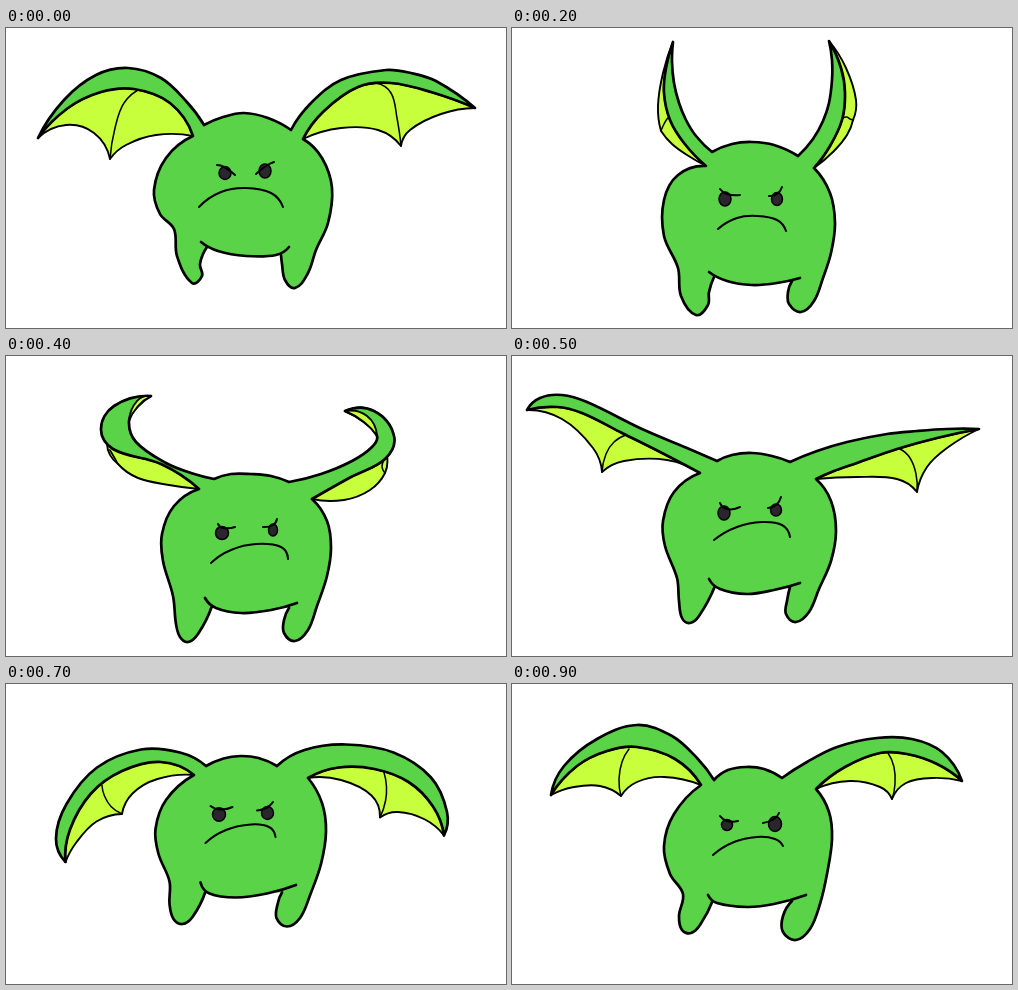
An HTML page for the animation above (1000 ms loop, 500x300 px).

```html
<!DOCTYPE html>
<html lang="en">
<head>
<meta charset="utf-8">
<title>Grumpy flyer</title>
<style>
html, body { margin: 0; width: 100%; height: 100%; overflow: hidden; background: #fff; }
svg { display: block; width: 100%; height: 100%; }
path { fill: none; stroke: #000; stroke-linecap: round; stroke-linejoin: round; }
.skin { fill: #5ad348; stroke-width: 2.7; }
.web { fill: #c8ff3c; stroke-width: 1.9; }
.rib { stroke-width: 1.5; }
.line { stroke-width: 2; }
.eye { fill: #29262d; stroke-width: 1.5; }
</style>
</head>
<body>
<svg id="stage" viewBox="0 0 500 300"></svg>
<script>
const STEP = 100, STEPS = 10;

// wing: arm (tip to root) / lower edge of the arm / web with its finger tip / rib
// side: from the wing root around the leg to the belly; eyes: x,y rx,ry
const KEYS = {
  0: {
    left: '32,110 58,72 90,47 122,40 155,50 180,73 198,97 / 62,80 95,64 128,61 164,75 / 60,97 88,105 104,131 120,117 150,107 / 109,100 118,75 136,60',
    right: '469,80 430,53 405,45 380,42 335,52 305,75 285,102 / 425,64 385,55 352,59 318,83 / 435,86 404,102 395,118 372,102 335,100 / 391,90 385,65 370,55',
    top: '217,89 238,85 262,90',
    sideL: '187,108 160,130 148,162 154,186 168,201 171,228 186,255 196,248 194,236 201,219',
    sideR: '297,111 316,130 326,160 322,195 310,222 302,245 289,260 279,252 276,236 275,227',
    belly: '195,214 212,223 240,228 270,227 283,219',
    mouth: '193,179 215,164 240,160 265,165 277,179',
    eyes: '219,145 6,6.5 259,143 6,7',
    browL: '211,137 218,139 229,147', browR: '268,134 260,138 250,146'
  },
  2: {
    left: '161,14 160,34 162,55 167,75 174,92 184,108 200,124 / 154,40 152,65 158,92 172,115 / 151,45 146,78 149,103 160,116 175,127 / 152,96 155,91 157,89',
    right: '317,13 320,32 320,52 317,75 311,93 301,111 286,128 / 329,40 333,65 330,92 318,118 / 334,40 344,72 341,92 335,107 322,123 / 338,91 335,89 331,90',
    top: '220,116 240,114 262,117',
    sideL: '194,138 166,147 152,172 152,208 166,240 169,268 184,287 196,277 197,264 202,249',
    sideR: '302,140 318,165 323,195 319,225 311,250 302,273 289,284 277,276 276,264 280,253',
    belly: '197,244 215,253 240,257 265,255 288,250',
    mouth: '206,201 225,190 245,188 265,192 274,203',
    eyes: '213,171 6,7 265,171 5.5,6.5',
    browL: '208,161 215,166 228,167', browR: '270,159 265,166 257,168'
  },
  4: {
    left: '145,40 132,50 123,65 130,86 160,107 185,117 208,123 / 108,50 95,73 107,93 155,108 / 110,60 101,88 112,108 132,122 163,129 / 104,94 106,98 109,103',
    right: '339,55 358,66 371,80 366,91 346,105 315,118 283,126 / 368,55 388,80 379,103 345,121 / 370,65 381,100 379,117 364,134 338,144 / 377,114 376,110 378,104',
    curls: ['145,40 131,45 123,65 / 132,50 145,40', '339,55 361,60 371,80 / 358,66 339,55'],
    top: '225,118 245,118 265,120',
    sideL: '193,133 168,150 156,178 157,205 167,240 170,268 174,281 182,286 192,278 206,250',
    sideR: '306,143 321,165 325,192 321,220 311,250 302,274 289,285 278,277 278,264 283,252',
    belly: '199,242 210,252 235,257 265,254 291,247',
    mouth: '205,207 225,194 250,188 275,191 282,203',
    eyes: '216,177 6.5,6.5 267,174 4.5,6',
    browL: '212,168 217,172 229,171', browR: '271,163 267,169 257,171'
  },
  5: {
    left: '15,54 28,42 50,39 75,46 130,73 175,92 205,105 / 45,51 70,57 110,77 150,97 / 50,63 81,92 90,116 112,105 155,104 / 94,98 102,86 114,79',
    right: '467,73 435,73 405,75 375,78 335,86 305,95 278,106 / 425,82 385,93 345,107 322,115 / 435,92 415,111 405,136 385,123 345,121 / 404,118 398,102 388,93',
    top: '220,99 240,97 260,100',
    sideL: '188,117 162,136 151,165 153,190 165,222 167,245 170,262 178,267 187,260 203,230',
    sideR: '304,123 319,145 324,175 319,205 307,233 297,256 284,266 274,258 275,245 278,231',
    belly: '197,223 208,233 235,238 262,234 288,227',
    mouth: '202,184 225,171 250,166 270,169 278,181',
    eyes: '212,157 6,7 264,154 5.5,6',
    browL: '208,147 215,153 228,151', browR: '269,141 264,149 256,152'
  },
  6: {
    left: '3,158 17,128 45,100 85,82 130,74 170,74 203,79 / 35,126 75,101 110,89 150,84 / 30,143 62,137 99,138 113,117 143,99 / 88,125 85,110 88,97',
    right: '480,125 460,103 430,84 390,70 345,66 305,70 273,81 / 445,100 405,87 365,83 330,85 / 445,117 408,120 398,133 386,111 345,93 / 398,112 393,97 385,85',
    top: '220,73 237,71 255,73',
    sideL: '188,90 160,112 150,140 153,165 164,195 164,220 168,235 176,239 186,232 200,205',
    sideR: '303,93 317,118 322,145 318,175 306,210 294,233 282,240 273,232 274,217 277,206',
    belly: '195,197 207,208 235,212 262,208 291,199',
    mouth: '200,158 220,144 245,139 264,142 270,152',
    eyes: '214,129 6.5,7 263,128 6,6.5',
    browL: '206,121 215,125 228,123', browR: '268,117 262,122 253,124'
  },
  8: {
    left: '116,198 83,181 76,140 97,85 140,57 178,63 197,85 / 93,165 95,118 122,85 160,72 / 112,172 119,138 133,122 140,102 160,91 / 122,120 112,114 104,106',
    right: '396,178 422,153 420,103 385,67 335,55 292,62 269,83 / 409,145 400,109 372,87 335,82 / 393,154 376,136 350,134 345,112 325,99 / 361,122 368,108 371,92',
    top: '215,76 232,73 250,75',
    sideL: '188,92 160,120 149,150 152,175 163,200 163,220 167,235 177,241 187,234 199,210',
    sideR: '301,95 315,120 318,150 312,185 303,210 294,235 280,245 268,236 270,220 275,211',
    belly: '194,200 200,211 225,215 260,211 289,203',
    mouth: '199,160 220,148 245,142 262,144 269,154',
    eyes: '212,132 6.5,6.5 260,130 6,6.5',
    browL: '203,123 213,126 225,123', browR: '266,119 260,125 249,129'
  },
  9: {
    left: '39,111 52,82 85,55 125,41 160,52 185,74 202,96 / 65,82 95,67 125,63 163,75 / 62,103 88,102 109,112 125,98 152,93 / 107,95 110,78 117,65',
    right: '450,97 430,68 400,55 365,54 325,63 295,78 270,94 / 425,80 395,70 368,69 333,83 / 420,94 394,99 380,115 368,103 338,97 / 383,100 382,83 376,69',
    top: '216,86 234,83 252,85',
    sideL: '189,101 162,130 152,162 158,190 171,210 167,232 170,246 179,249 188,241 201,216',
    sideR: '304,105 317,128 320,155 315,190 308,220 298,245 284,256 271,248 271,232 280,217',
    belly: '196,211 205,219 235,223 262,220 294,211',
    mouth: '201,171 222,158 245,153 263,155 271,162',
    eyes: '215,141 5.5,5.5 263,140 6.5,7.5',
    browL: '208,132 215,137 226,137', browR: '267,129 262,135 251,139'
  }
};

const parse = text => text.split(' / ').map(run => run.split(' ').map(p => p.split(',').map(Number)));
const mapObject = (obj, fn) => Object.fromEntries(Object.entries(obj).map(([k, v]) => [k, fn(v, k)]));
const mix = (a, b, u) => Array.isArray(a) ? a.map((v, i) => mix(v, b[i], u)) : a + (b - a) * u;
const flip = pts => [...pts].reverse();

for (const key in KEYS) {
  KEYS[key] = mapObject(KEYS[key], v => Array.isArray(v) ? v.map(parse) : parse(v));
}

// Poses between two drawings are blended halfway.
function poseAt(step) {
  if (KEYS[step]) return KEYS[step];
  const a = KEYS[step - 1], b = KEYS[step + 1];
  const { curls, ...shared } = a;
  return mapObject(shared, (v, k) => mix(v, b[k], 0.5));
}

// Smooth curve through the points, handles scaled to each chord.
function spline(pts) {
  const last = pts.length - 1;
  const tangent = i => {
    const dx = pts[i + 1][0] - pts[i - 1][0], dy = pts[i + 1][1] - pts[i - 1][1];
    const len = Math.hypot(dx, dy) || 1;
    return [dx / len, dy / len];
  };
  let d = '';
  for (let i = 0; i < last; i++) {
    const p = pts[i], q = pts[i + 1];
    const reach = 0.35 * Math.hypot(q[0] - p[0], q[1] - p[1]);
    const along = (o, t, s) => [o[0] + t[0] * reach * s, o[1] + t[1] * reach * s];
    const third = [(q[0] - p[0]) / 3, (q[1] - p[1]) / 3];
    let c1 = i > 0 ? along(p, tangent(i), 1) : null;
    let c2 = i + 1 < last ? along(q, tangent(i + 1), -1) : null;
    if (!c1 && !c2) { c1 = p; c2 = q; }
    if (!c1) c1 = [c2[0] - third[0], c2[1] - third[1]];
    if (!c2) c2 = [c1[0] + third[0], c1[1] + third[1]];
    d += 'C' + [c1, c2, q].map(v => v.map(n => n.toFixed(1)).join(' ')).join(' ');
  }
  return d;
}

// Runs joined end to end, with a corner between them.
const outline = (...runs) => 'M' + runs[0][0].join(' ') + runs.map(spline).join('');

function ellipse([x, y], [rx, ry]) {
  return `M${x - rx} ${y}a${rx} ${ry} 0 1 1 ${2 * rx} 0a${rx} ${ry} 0 1 1 ${-2 * rx} 0Z`;
}

function wing([arm, mids, web, rib], base) {
  const tip = arm[0], finger = web[2];
  const edge = [tip, ...mids, base];
  return {
    arm, edge,
    web: outline(flip(edge), [tip, web[0], web[1], finger], [finger, web[3], web[4], base]) + 'Z',
    rib: outline([finger, ...rib])
  };
}

const stage = document.getElementById('stage');
const part = {};
function add(name, cls) {
  part[name] = document.createElementNS('http://www.w3.org/2000/svg', 'path');
  part[name].setAttribute('class', cls);
  stage.append(part[name]);
}
[['webs', 'web'], ['ribs', 'rib'], ['body', 'skin'], ['curls', 'web'], ['belly', 'skin'],
 ['mouth', 'line'], ['eyes', 'eye'], ['brows', 'line']].forEach(p => add(...p));

function draw(pose) {
  const sideL = pose.sideL[0], sideR = pose.sideR[0], eyes = pose.eyes[0];
  const l = wing(pose.left, sideL[0]), r = wing(pose.right, sideR[0]);
  const top = [l.arm[6], ...pose.top[0], r.arm[6]];
  const shapes = {
    webs: l.web + r.web,
    ribs: l.rib + r.rib,
    body: outline(flip(sideL), flip(l.edge), l.arm, top, flip(r.arm), r.edge, sideR),
    curls: (pose.curls || []).map(([out, back]) => outline(out, [out[2], ...back]) + 'Z').join(''),
    belly: outline(pose.belly[0]),
    mouth: outline(pose.mouth[0]),
    eyes: ellipse(eyes[0], eyes[1]) + ellipse(eyes[2], eyes[3]),
    brows: outline(pose.browL[0]) + outline(pose.browR[0])
  };
  for (const name in shapes) part[name].setAttribute('d', shapes[name]);
}

const start = performance.now();
let shown = -1;
function tick() {
  const step = Math.floor((performance.now() - start) / STEP) % STEPS;
  if (step !== shown) draw(poseAt(shown = step));
  requestAnimationFrame(tick);
}
tick();
</script>
</body>
</html>
```
